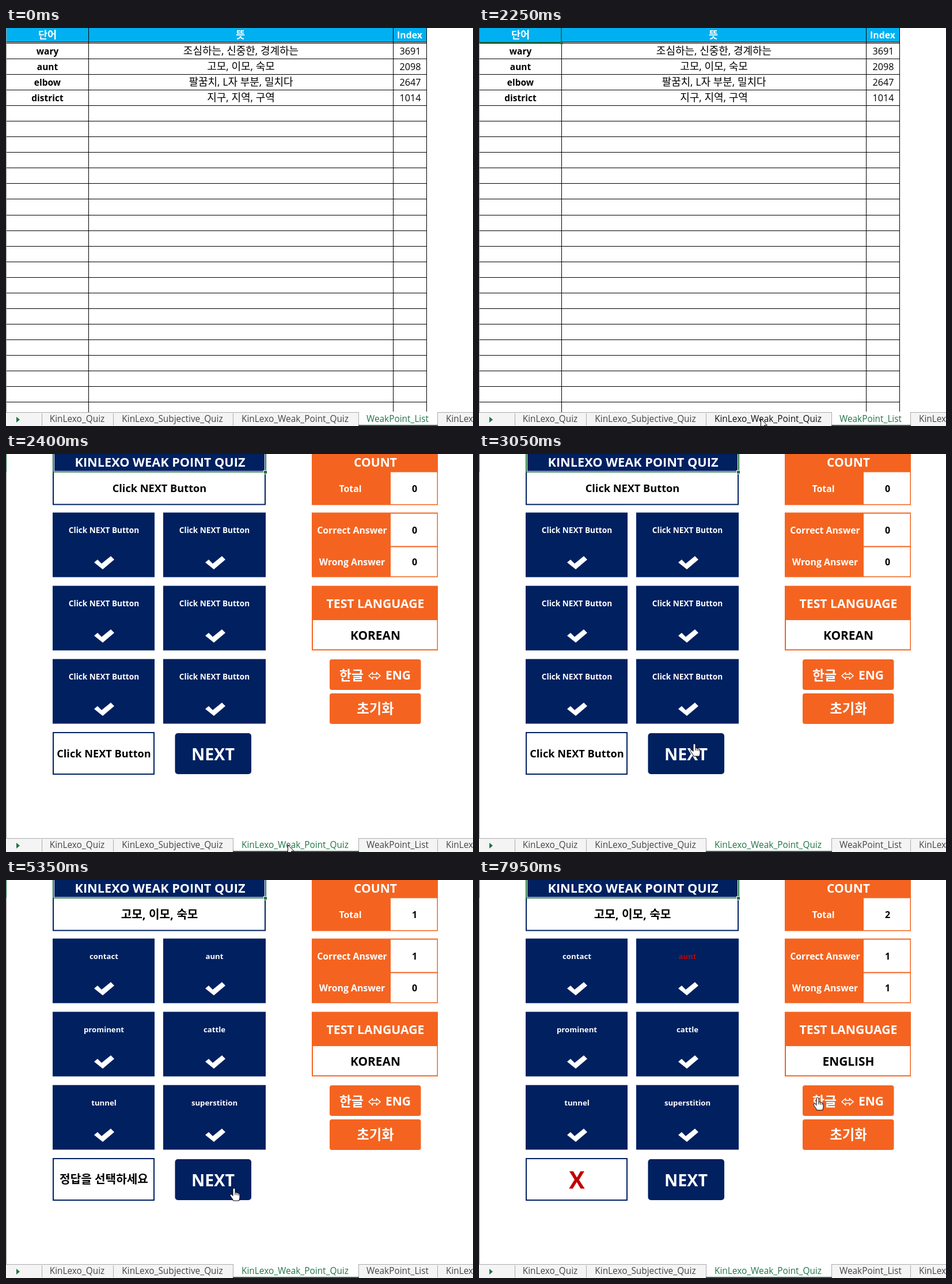
An HTML page for the animation above (8000 ms loop, 811 by 690 pixels).

```html
<!DOCTYPE html>
<html lang="ko">
<head>
<meta charset="utf-8">
<title>Weak point quiz</title>
<style>
  html, body { margin: 0; width: 100%; height: 100%; overflow: hidden; background: #fff; }
  svg { display: block; font-family: "Open Sans", "Noto Sans CJK KR", "Noto Sans CJK", sans-serif; }
  text { white-space: pre; }
</style>
</head>
<body>
<svg id="stage" width="811" height="690" viewBox="0 0 811 690"></svg>
<script>
const LOOP = 8000, STEP = 50;
const NAVY = '#002060', ORANGE = '#f46420', GREEN = '#217346', BLUE = '#00b0f0';
const stage = document.getElementById('stage');

function add(parent, tag, attrs, content) {
  const el = document.createElementNS('http://www.w3.org/2000/svg', tag);
  for (const k in attrs) el.setAttribute(k, attrs[k]);
  if (content !== undefined) el.textContent = content;
  return parent.appendChild(el);
}
const group = parent => add(parent, 'g', {});
const box = (p, x, y, x2, y2, fill, rx = 0) =>
  add(p, 'rect', { x, y, width: x2 - x, height: y2 - y, fill, rx });
const label = (p, str, x, y, size, fill = '#000', weight = 700, anchor = 'middle') =>
  add(p, 'text', { x, y, 'font-size': size, fill, 'font-weight': weight, 'text-anchor': anchor }, str);
function frame(p, x, y, x2, y2, color) {
  box(p, x, y, x2, y2, color);
  box(p, x + 2, y + 2, x2 - 2, y2 - 2, '#fff');
}

// Word list sheet
const list = group(stage);
box(list, 0, 0, 811, 690, '#fff');
box(list, 0, 0, 730, 24, BLUE);
box(list, 0, 24, 731, 25, '#000');
box(list, 0, 26, 731, 27, '#000');
for (let i = 0; i < 23; i++) {
  const y = Math.round(53 + 27.05 * i);
  box(list, 0, y, 731, y + 1, '#000');
}
[143, 672, 730].forEach(x => box(list, x, 0, x + 1, 666, '#000'));
box(list, 0, 0, 1, 666, '#999');
label(list, '단어', 72, 17.5, 17.5, '#fff');
label(list, '뜻', 407, 17.5, 17.5, '#fff');
label(list, 'Index', 701, 18, 15.8, '#fff');
[
  ['wary', '조심하는, 신중한, 경계하는', 3691],
  ['aunt', '고모, 이모, 숙모', 2098],
  ['elbow', '팔꿈치, L자 부분, 밀치다', 2647],
  ['district', '지구, 지역, 구역', 1014]
].forEach(([word, meaning, index], i) => {
  const y = 46 + 27.1 * i;
  label(list, word, 72, y, 15.5);
  label(list, meaning, 408, y - 0.5, 18, '#000', 400);
  label(list, index, 702, y, 16.2, '#000', 400);
});
const picked = group(list);
box(picked, 0, 0, 1, 25, GREEN);
box(picked, 0, 24, 141, 26, GREEN);
box(picked, 142, 0, 144, 22, GREEN);
box(picked, 141, 23, 146, 28, GREEN);

// Quiz sheet
const quiz = group(stage);
box(quiz, 0, 0, 811, 690, '#fff');
box(quiz, 0, 0, 1, 666, '#999');
box(quiz, 0, 0, 1, 31, GREEN);
frame(quiz, 81, 29, 451, 88.5, NAVY);
box(quiz, 81, 0, 452, 32, GREEN);
box(quiz, 83, 0, 450, 30.5, '#fff');
box(quiz, 84, 0, 449, 29.5, NAVY);
box(quiz, 447, 28, 454, 35, '#fff');
box(quiz, 448, 29, 453, 34, GREEN);
label(quiz, 'KINLEXO WEAK POINT QUIZ', 267.5, 22, 21.7, '#fff');
const question = label(quiz, '', 266.5, 66, 18.2);

const hot = [];
const words = [];
for (let i = 0; i < 6; i++) {
  const x = i % 2 ? 273 : 81, y = 101.5 + 127 * (i >> 1);
  box(quiz, x, y, x + (i % 2 ? 178 : 177), y + 112, NAVY);
  hot.push([x, y, x + 177, y + 112]);
  words.push(label(quiz, '', x + 89, y + 35.5, 13.5, '#fff'));
  add(quiz, 'path', {
    d: 'M0 11L6 6L13 13L29 0L35 6L15 23Z', fill: '#fff',
    transform: `translate(${x ? x + (i % 2 ? 73 : 72) : 0} ${y + 75.5})`
  });
}
frame(quiz, 81, 482, 258, 556, NAVY);
const verdict = label(quiz, '', 170, 526, 18.2);
box(quiz, 293.5, 484, 426, 555, NAVY, 5);
label(quiz, 'NEXT', 359.5, 530.5, 28.6, '#fff');

box(quiz, 531, 0, 750, 88.5, ORANGE);
box(quiz, 668, 31.5, 748.5, 87, '#fff');
box(quiz, 531, 101.5, 750, 213.5, ORANGE);
box(quiz, 668, 103.5, 748.5, 159.5, '#fff');
box(quiz, 668, 161.5, 748.5, 212, '#fff');
box(quiz, 531, 228.5, 750, 340.5, ORANGE);
box(quiz, 533, 288, 748.5, 338.5, '#fff');
label(quiz, 'COUNT', 641.5, 22, 21, '#fff');
const counts = [['Total', 598, 66], ['Correct Answer', 601, 138], ['Wrong Answer', 601, 193]]
  .map(([name, x, y]) => {
    label(quiz, name, x, y, 15.8, '#fff');
    return label(quiz, '0', 709.5, y, 16);
  });
label(quiz, 'TEST LANGUAGE', 641.5, 266.5, 21.2, '#fff');
const language = label(quiz, '', 641.5, 321.5, 20.9);
box(quiz, 562, 356, 720.5, 409, ORANGE, 4);
box(quiz, 562, 415, 720.5, 468, ORANGE, 4);
label(quiz, '한글', 600, 391.5, 22.8, '#fff');
label(quiz, 'ENG', 681, 391, 21, '#fff');
add(quiz, 'path', {
  d: 'M630 384.5L636.5 379V382H643.5V379L650 384.5L643.5 390V387H636.5V390Z',
  fill: 'none', stroke: '#fff', 'stroke-width': 1.6
});
label(quiz, '초기화', 641.5, 450, 23.3, '#fff');
hot.push([293, 484, 426, 562], [562, 356, 720, 409], [562, 415, 720, 468]);

// Sheet tabs
const bar = group(stage);
box(bar, 0, 666, 811, 690, '#f4f4f4');
box(bar, 0, 666, 811, 667, '#ababab');
const edges = [62, 186, 394, 612, 749];
edges.forEach(x => box(bar, x, 668, x + 1, 689, '#ababab'));
add(bar, 'path', { d: 'M18 674L24 679L18 684Z', fill: GREEN });
const active = group(bar);
box(active, 0, 665, 138, 690, '#fff');
box(active, 0, 666, 1, 690, '#ababab');
const rightEdge = box(active, 137, 666, 138, 690, '#ababab');
const underline = box(active, 0, 688, 138, 690, GREEN);
const tabs = ['KinLexo_Quiz', 'KinLexo_Subjective_Quiz', 'KinLexo_Weak_Point_Quiz', 'WeakPoint_List']
  .map((name, i) => label(bar, name, [123.5, 289, 502, 680][i], 683, 15.4, '#444', 400));
label(bar, 'KinLexo_Words', 764, 683, 15.4, '#444', 400, 'start');

function setTab(i) {
  const x = edges[i], w = edges[i + 1] - x + 1;
  active.setAttribute('transform', `translate(${x} 0)`);
  active.firstChild.setAttribute('width', w);
  underline.setAttribute('width', w);
  rightEdge.setAttribute('x', w - 1);
}

// Pointer
const pointer = group(stage);
const ink = { fill: '#fff', stroke: '#000', 'stroke-width': 1, 'stroke-linejoin': 'round' };
const arrow = add(pointer, 'path', { ...ink, d: 'M.5 .5V16L4 12.7L6.6 18.5L8.9 17.5L6.4 11.8H11.3Z' });
const hand = add(pointer, 'path', {
  ...ink,
  d: 'M-2 2C-2 0 2 0 2 2V8.5C2 7 5 7 5 9C5 7.8 8 8 8 10C8 9 10 9.4 10 11.5V16C10 18.5 9 19 9 22H-1.5' +
     'C-1.5 20-4.5 17-6.5 13.5C-7.5 11.5-5.5 10-4 11.5L-2 13.5ZM2 8.5V12M5 9V12.5M8 10V13'
});
// time, x, y
const path = [
  [600, 789, 643], [650, 756, 672], [700, 735, 700], [950, 670, 700], [1000, 651, 684],
  [1200, 560, 673], [1400, 489, 677], [2550, 489, 677], [2750, 425, 595], [2950, 373, 483],
  [3050, 374, 502], [3800, 374, 502], [4150, 376, 340], [4500, 375, 173], [4700, 375, 173],
  [5000, 460, 380], [5250, 396, 534], [5600, 396, 534], [5700, 396, 538], [5850, 396, 538],
  [6150, 285, 425], [6350, 207, 326], [6450, 206, 324], [7050, 206, 324], [7250, 552, 327],
  [7350, 552, 327], [7550, 588, 371], [7900, 588, 371], [7950, 588, 377]
];
function pointerAt(t) {
  const i = path.findIndex(p => p[0] > t);
  if (i < 0) return path[path.length - 1].slice(1);
  const [t0, x0, y0] = path[i - 1], [t1, x1, y1] = path[i];
  const k = (t - t0) / (t1 - t0);
  return [x0 + (x1 - x0) * k, y0 + (y1 - y0) * k];
}

// Quiz rounds
const ASK = '정답을 선택하세요', CLICK = 'Click NEXT Button';
const rounds = [
  { from: 0, ask: CLICK, words: Array(6).fill(CLICK) },
  { from: 3450, ask: '조심하는, 신중한, 경계하는',
    words: ['second', 'wary', 'contain', 'horizon', 'notwithstanding', 'compliment'] },
  { from: 5350, ask: '고모, 이모, 숙모',
    words: ['contact', 'aunt', 'prominent', 'cattle', 'tunnel', 'superstition'] }
];
const clamp = v => Math.max(0, Math.min(1, v));

function write(el, str, size, y, fill) {
  if (el.textContent !== str) el.textContent = str;
  if (size) el.setAttribute('font-size', size);
  if (y) el.setAttribute('y', y);
  if (fill) el.setAttribute('fill', fill);
}

function draw(t) {
  const quizOn = t >= 2350;
  picked.setAttribute('opacity', clamp((t - 1550) / 200));
  quiz.setAttribute('opacity', t >= 2400 ? 1 : quizOn ? 0.765 : 0);
  setTab(quizOn ? 2 : 3);
  tabs[3].setAttribute('fill', quizOn ? '#444' : GREEN);
  tabs[2].setAttribute('fill', quizOn ? GREEN : t >= 1600 ? '#111' : '#444');

  const n = t >= rounds[2].from ? 2 : t >= rounds[1].from ? 1 : 0;
  write(question, rounds[n].ask, n ? 20.2 : 18.2, n ? 66.5 : 66);
  words.forEach((el, i) => write(el, rounds[n].words[i], n ? 13.2 : 13.6));
  words[1].setAttribute('fill', t >= 6650 ? '#c00000' : '#fff');

  if (n === 0) write(verdict, CLICK, 18.2, 526, '#000');
  else if (n === 1 && t >= 4600) write(verdict, 'O', 41, 534.5, '#000099');
  else if (t >= 6600) write(verdict, 'X', 41, 534.5, '#c00000');
  else write(verdict, ASK, 20.2, 526, '#000');

  const right = t >= 4650 ? 1 : 0, wrong = t >= 6700 ? 1 : 0;
  [right + wrong, right, wrong].forEach((v, i) => write(counts[i], String(v)));
  write(language, t >= 7700 ? 'ENGLISH' : 'KOREAN');

  pointer.setAttribute('visibility', t < 600 ? 'hidden' : 'visible');
  if (t >= 600) {
    const [x, y] = pointerAt(t);
    const over = quizOn && hot.some(r => x >= r[0] && x <= r[2] && y >= r[1] && y <= r[3]);
    arrow.setAttribute('display', over ? 'none' : 'inline');
    hand.setAttribute('display', over ? 'inline' : 'none');
    pointer.setAttribute('transform', `translate(${x} ${y})`);
  }
}

const start = performance.now();
function tick() {
  const t = (performance.now() - start) % LOOP;
  draw(Math.floor(t / STEP) * STEP);
  requestAnimationFrame(tick);
}
tick();
</script>
</body>
</html>
```
